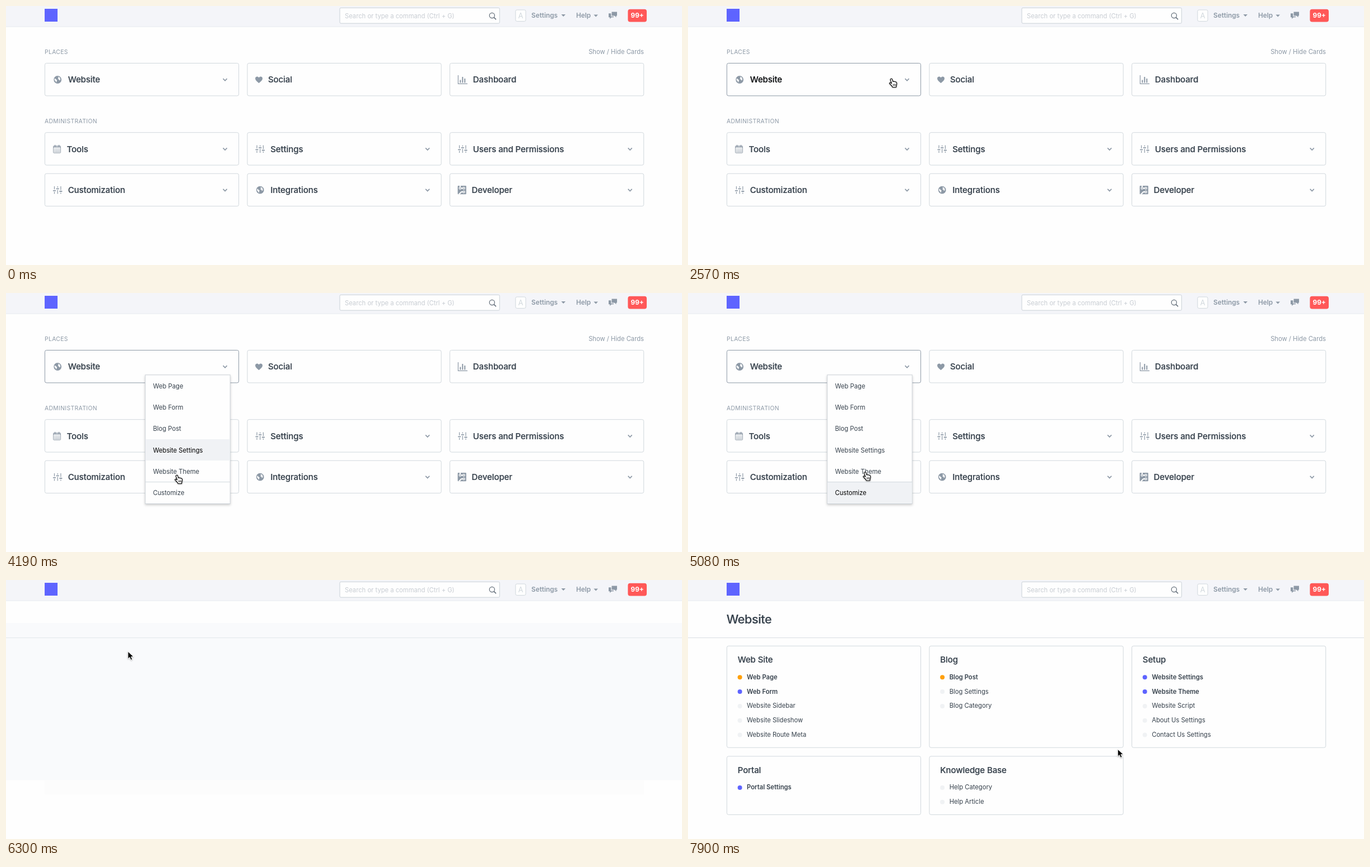
Recreate the animation shown at these times as an HTML page. Size 1207 by 464 pixels, loop 8000 ms.

```html
<!DOCTYPE html>
<html lang="en">
<head>
<meta charset="utf-8">
<title>Desk navigation</title>
<style>
  html, body { margin: 0; width: 100%; height: 100%; overflow: hidden; background: #fefefe; }
  svg { display: block; font-family: Inter, sans-serif; }
  text { font-size: 11.22px; fill: #36414c; }
  .muted { fill: #8d99a6; }
  .caps { font-size: 10.3px; letter-spacing: .4px; fill: #8d99a6; }
  .nav { font-size: 11.8px; font-weight: 600; fill: #8d99a6; }
  .head { font-size: 15px; font-weight: 500; letter-spacing: -.006em; stroke: #36414c; stroke-width: .2; }
  .title { font-size: 21.6px; font-weight: 500; letter-spacing: -.02em; stroke: #36414c; stroke-width: .2; }
  .strong { font-weight: 600; }
  .card { fill: #fefefe; stroke: #d1d8dd; }
  .line { fill: none; stroke: #8d99a6; }
  .icon { fill: #8d99a6; }
  .on .card { stroke: #8d99a6; }
  .hover .head, .item.hover { fill: #000; }
</style>
</head>
<body>
<svg width="1207" height="464" viewBox="0 0 1207 464">
  <defs>
    <filter id="soft" x="-20%" y="-20%" width="140%" height="140%">
      <feDropShadow dx="0" dy="2" stdDeviation="2" flood-color="#000" flood-opacity=".2"/>
    </filter>
    <filter id="drop" x="-40%" y="-40%" width="180%" height="180%">
      <feDropShadow dx="0" dy="1" stdDeviation=".8" flood-color="#000" flood-opacity=".35"/>
    </filter>
  </defs>
  <rect width="1207" height="464" fill="#fefefe"/>
  <g id="nav"></g>
  <g id="home"></g>
  <g id="blank">
    <rect y="77" width="1207" height="281.5" fill="#f9fafc"/>
    <rect x="69" y="358.5" width="1070" height="25" fill="#fcfcfc"/>
    <path d="M0 103.5H1207" stroke="#e3e7ec"/>
  </g>
  <g id="page"></g>
  <g id="lists"></g>
  <g id="menu"></g>
  <g id="arrow" filter="url(#drop)">
    <path d="M.8 1.2V14.2L3.8 11.4 6 16.3 8.5 15.3 6.4 10.5H10.7Z" fill="#000" stroke="#fff" stroke-width=".9"/>
  </g>
  <g id="hand" filter="url(#drop)">
    <path d="M3.2 1.6C4.2.9 5.3 1.3 5.7 2.6L6.8 6.3C7.5 5.6 8.6 5.7 9 6.6 9.8 6 10.8 6.2 11.2 7.1 12.3 6.7 13.4 7.2 13.6 8.5 13.9 10.5 13.6 12 13 13.5L12.6 16.5H6.4C5.6 15 4.6 13.5 3.2 12.2L1.2 10.4C.2 9.4 1.2 8 2.4 8.5L4.6 9.8 2.4 3.4C2.2 2.6 2.5 2 3.2 1.6Z" fill="#fff" stroke="#000" stroke-width="1.2" stroke-linejoin="round"/>
    <path d="M7.2 10.8L7.7 14M9.2 10.6L9.5 14M11.2 10.4L11.3 14" stroke="#000" stroke-width=".8"/>
  </g>
</svg>
<script>
const $ = id => document.getElementById(id);
const CARD_W = 346.2;
const colX = i => 69.4 + (i % 3) * 361.55;

const label = (x, y, s, cls = '', extra = '') =>
  `<text x="${x}" y="${y}" class="${cls}" ${extra}>${s}</text>`;
const box = (x, y, h) =>
  `<rect class="card" x="${x}" y="${y}" width="${CARD_W}" height="${h}" rx="3"/>`;
const at = (x, y, inner) => `<g transform="translate(${x} ${y})">${inner}</g>`;

// One slider: a track with a gap around its handle.
const slider = (x, y) => `<path class="line" stroke-width="1.2"
  d="M${x}-6.8V${y - 2.2}M${x} ${y + 2.2}V6.8"/>
  <path class="line" stroke-width="1.8" stroke-linecap="round" d="M${x - 1.8} ${y}H${x + 1.8}"/>`;

// Icons: width and drawing around the centre.
const icons = {
  globe: [17.5, `<circle class="icon" r="6.9"/>
    <path d="M-5-2.6L-2.8-.4-1 .8-1.6 2.6-2 5-3.8 2.6-5.6.6ZM.4-5.4L4-4 5 0 3.4 1.6 2.2-.6.4-1.4 1.6-3.2Z" fill="#fefefe"/>`],
  heart: [13.2, `<path class="icon" d="M0 6.2C-3.5 3.2-6.5.8-6.5-2.2-6.5-6-1.8-6.8 0-3.6 1.8-6.8 6.5-6 6.5-2.2 6.5.8 3.5 3.2 0 6.2Z"/>`],
  chart: [17.5, `<path class="line" d="M-7.9-8V7.3H8.7" stroke-width="1.2"/>
    <path class="line" d="M-4 5.5V.5M0 5.5V-5M4 5.5V-2" stroke-width="2"/>`],
  sliders: [17.5, slider(-5.7, 1.1) + slider(0, -2.3) + slider(5.7, 2.3)],
  calendar: [15.3, `<rect class="line" x="-6.4" y="-5.5" width="12.8" height="12.5" rx=".8"/>
    <path class="line" d="M-6.4-3.6H6.4" stroke-width="1.6"/>
    <path class="line" d="M-3.5-7.5V-4M3.5-7.5V-4" stroke-width="1.4"/>
    <path class="line" d="M-4.5 0H5M-4.5 2.4H5M-4.5 4.8H5" stroke-width="1.3" stroke-dasharray="1.5 1.1"/>`],
  board: [15.3, `<rect class="icon" x="-7.6" y="-7.6" width="15.2" height="15.2" rx="1"/>
    <g fill="none" stroke="#fefefe" stroke-width="1.3"><circle cx="-3.3" cy="-3.3" r="1.7"/>
    <circle cx="3.3" cy="-3.3" r="1.7"/><circle cx="3.3" cy="3.3" r="1.7"/>
    <path d="M-3.3-8V-5M-1.6-3.3H1.6M1.6 3.3H-1L-5.5 7.8" stroke-width="2"/></g>`]
};
const chevron = '<path class="line" d="M-3.5-1.8L0 1.8 3.5-1.8" stroke-width="1.7"/>';
const caret = '<path class="icon" d="M-3.8-2H3.8L0 2Z"/>';

$('nav').innerHTML = `
  <rect width="1207" height="37" fill="#f4f5f9"/>
  <path d="M0 37H1207" stroke="#e6e9ef"/>
  <rect x="69" y="5" width="23" height="23" fill="#5e64ff"/>
  <rect x="596" y="3.3" width="285.3" height="27.8" rx="2" fill="#fefefe" stroke="#c9d0d7"/>
  <g fill="none" stroke="#5f6a76" stroke-width="1.2">
    <circle cx="867.8" cy="17" r="4.6"/><path d="M871.2 20.4L875 24.2" stroke-width="1.6"/></g>
  <rect x="909.8" y="7" width="18.2" height="20.4" rx="2.5" fill="#fefefe" stroke="#d1d8dd"/>`
  + label(605, 22, 'Search or type a command (Ctrl + G)', '', 'style="fill:#c8cdd3"')
  + label(919, 22, 'A', '', 'text-anchor="middle" style="fill:#d1d8dd;font-size:13px"')
  + label(938, 21, 'Settings', 'nav') + at(995.2, 17, caret)
  + label(1018, 21, 'Help', 'nav') + at(1053.2, 17.6, caret)
  + `<path class="icon" d="M1081.5 10.5H1091V17.5H1089.5V20.3L1086.6 17.5H1081.5Z"/>
  <path class="icon" d="M1076 13.2H1080.3V18.7H1085V20.3H1081.2L1078.2 23V20.3H1076Z"/>
  <rect x="1110.4" y="5.8" width="33.6" height="22.8" rx="4" fill="#ff5858"/>`
  + label(1127.2, 21.2, '99+', 'nav', 'text-anchor="middle" style="fill:#fff;font-weight:700"');

const rowY = [102.5, 226.7, 300.2];
const plain = ['Social', 'Dashboard'];
const tiles = [
  ['Website', 'globe'], ['Social', 'heart'], ['Dashboard', 'chart'],
  ['Tools', 'calendar'], ['Settings', 'sliders'], ['Users and Permissions', 'sliders'],
  ['Customization', 'sliders'], ['Integrations', 'globe'], ['Developer', 'board']
];
function tile([name, icon], i) {
  const x = colX(i), y = rowY[Math.floor(i / 3)], [w, art] = icons[icon];
  return `<g id="${name}">` + box(x, y, 58.4)
    + at(x + 14 + w / 2, y + 29.5, art)
    + label(x + 23.8 + w, y + 34.9, name, 'head')
    + (plain.includes(name) ? '' : at(x + 321.7, y + 29.5, chevron)) + '</g>';
}
$('home').innerHTML = label(69, 86, 'PLACES', 'caps') + label(69, 210, 'ADMINISTRATION', 'caps')
  + label(1139, 86, 'Show / Hide Cards', 'muted', 'text-anchor="end"')
  + tiles.map(tile).join('');

const MENU_Y = 147.6, ITEM_H = 38.15;
const items = ['Web Page', 'Web Form', 'Blog Post', 'Website Settings', 'Website Theme', 'Customize'];
$('menu').innerHTML = `
  <rect x="248.7" y="146.8" width="151.5" height="230.7" fill="#fefefe" stroke="#ccd2d8" filter="url(#soft)"/>
  <rect id="mark" x="249.2" width="150.5" height="${ITEM_H}" fill="#f0f2f5"/>
  <path d="M249 338.6H400" stroke="#d1d8dd"/>`
  + items.map((s, i) => label(262.5, MENU_Y + 23.5 + i * ITEM_H, s, 'item')).join('');
const itemTexts = document.querySelectorAll('.item');

$('page').innerHTML = label(68.7, 78.4, 'Website', 'title')
  + '<path d="M0 103.5H1207" stroke="#d9dee3"/>';

// Each entry starts with its dot: o orange, b blue, - pale.
const DOTS = { o: '#ffa00a', b: '#5e64ff', '-': '#f0f2f4' };
const LINE_H = 25.8;
const groups = [
  ['Web Site', 'oWeb Page', 'bWeb Form', '-Website Sidebar', '-Website Slideshow', '-Website Route Meta'],
  ['Blog', 'oBlog Post', '-Blog Settings', '-Blog Category'],
  ['Setup', 'bWebsite Settings', 'bWebsite Theme', '-Website Script', '-About Us Settings', '-Contact Us Settings'],
  ['Portal', 'bPortal Settings'],
  ['Knowledge Base', '-Help Category', '-Help Article']
];
function group([head, ...links], i) {
  const x = colX(i), lower = i > 2;
  const y = lower ? 315.8 : 118.2, h = 53 + LINE_H * (lower ? 2 : 5);
  return box(x, y, h) + label(x + 19.3, y + 29.9, head, 'head')
    + links.map((link, k) => {
      const ly = y + 55.8 + k * LINE_H;
      return `<circle cx="${x + 23.2}" cy="${ly + .3}" r="4" fill="${DOTS[link[0]]}"/>`
        + label(x + 35.7, ly + 3.8, link.slice(1), link[0] === '-' ? '' : 'strong');
    }).join('');
}
$('lists').innerHTML = groups.map(group).join('');

// Pointer strokes: first and last step in ms, end point, bow to one side.
const strokes = [
  [630, 630, 763, 376],
  [780, 1310, 883, 147.5, .1], [1400, 1570, 636, 111, .19],
  [2040, 2570, 359, 129, .15], [2660, 2930, 384, 126],
  [3380, 3640, 338, 172],
  [3820, 4190, 301, 325], [4280, 4550, 300, 355],
  [5000, 5440, 373, 142], [5530, 5800, 187, 130, .1],
  [6000, 6120, 193, 132], [6300, 6510, 265, 117],
  [6780, 6780, 276, 119],
  [6930, 7370, 330, 404, .75], [7460, 7730, 735, 328, .19],
  [7820, 7900, 766.5, 302]
];
const STEP = 89;

// A stroke advances in even steps along a quadratic curve.
function pointer(t) {
  let x = 763, y = 376;
  for (const [first, last, ex, ey, bow = 0] of strokes) {
    if (t < first) break;
    const gaps = Math.round((last - first) / STEP);
    const done = gaps ? Math.min(gaps, Math.floor((t - first) / (last - first) * gaps + .05)) : 0;
    const u = (done + 1) / (gaps + 1), dx = ex - x, dy = ey - y, side = 2 * u * (1 - u) * bow;
    x += dx * u - dy * side;
    y += dy * u + dx * side;
  }
  return [x, y];
}

const show = (id, on) => $(id).style.display = on ? '' : 'none';
const between = (t, a, b) => t >= a && t < b;
const inCard = (x, y, i) => between(x + 5, colX(i), colX(i) + CARD_W) && between(y + 2, rowY[0], rowY[0] + 58.4);

function draw(t) {
  const [x, y] = pointer(t);
  const home = t < 6120, hand = between(t, 2040, 6120), menu = between(t, 3110, 6000);

  show('home', home);
  show('blank', between(t, 6300, 6510));
  show('page', t >= 6390);
  show('lists', t >= 6510);
  show('menu', menu);
  show('arrow', t >= 630 && !hand);
  show('hand', hand);
  $(hand ? 'hand' : 'arrow').setAttribute('transform', `translate(${x} ${y})`);

  const overMenu = menu && x > 244 && y > MENU_Y;
  ['Website', 'Social'].forEach((name, i) => {
    const over = hand && !overMenu && inCard(x, y, i);
    $(name).classList.toggle('hover', over);
    $(name).classList.toggle('on', over || (menu && i === 0));
  });

  // The menu highlight trails the pointer by one step.
  const trail = pointer(t - STEP)[1];
  const hot = overMenu && trail > MENU_Y
    ? Math.min(items.length - 1, Math.floor((trail + 1 - MENU_Y) / ITEM_H)) : -1;
  show('mark', hot >= 0);
  $('mark').setAttribute('y', MENU_Y + Math.max(0, hot) * ITEM_H);
  itemTexts.forEach((el, i) => el.classList.toggle('hover', i === hot));
}

const start = performance.now();
function tick() {
  draw((performance.now() - start) % 8000);
  requestAnimationFrame(tick);
}
tick();
</script>
</body>
</html>
```
